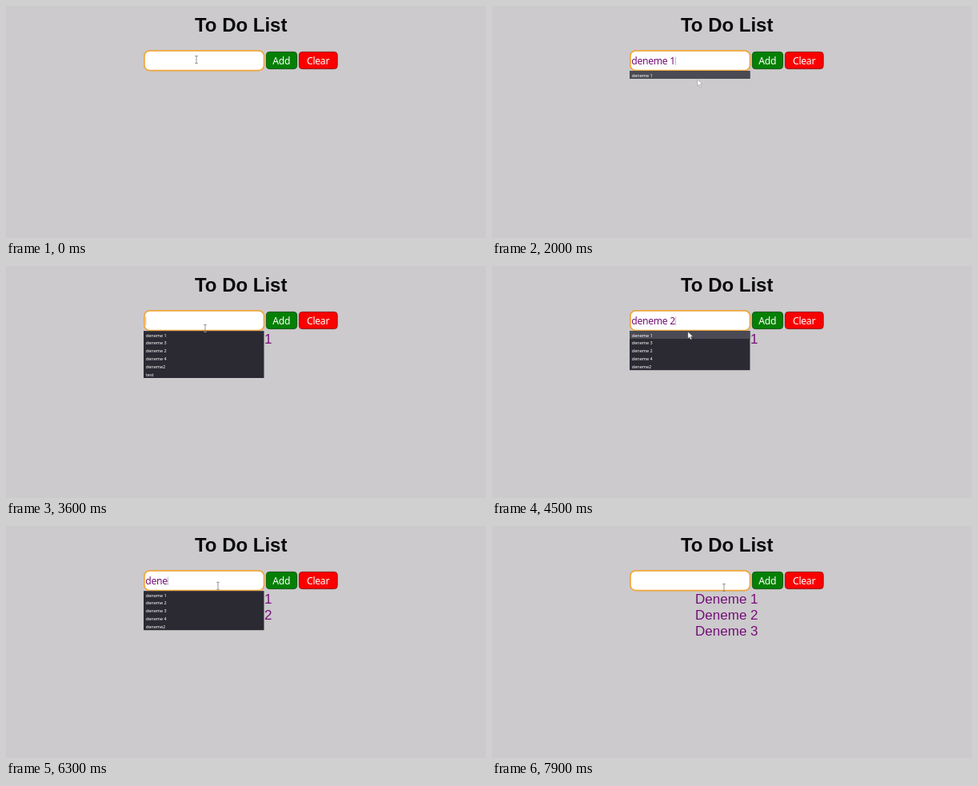
Animation of 600 by 290 pixels, one loop 8000 ms. Source, as an HTML page:

```html
<!DOCTYPE html>
<html lang="en">
<head>
<meta charset="utf-8">
<title>To Do List</title>
<style>
  html, body { margin: 0; width: 100%; height: 100%; overflow: hidden; background: #cccacc; }
  svg { display: block; width: 600px; height: 290px; }
  text { white-space: pre; }
  .ui { font-family: "Noto Sans", "Open Sans", sans-serif; font-size: 12.2px; letter-spacing: -.3px; }
  .arial { font-family: "Liberation Sans", Arial, sans-serif; }
  .purple { fill: #761078; }
  #rows { font-size: 5.5px; font-weight: 500; letter-spacing: 0; fill: #fff; }
</style>
</head>
<body>
<svg viewBox="0 0 600 290">
  <rect width="600" height="290" fill="#cccacc"/>
  <text class="arial" x="293.7" y="32.4" font-size="24" font-weight="bold" text-anchor="middle" fill="#08080c">To Do List</text>
  <g id="items" class="arial purple" font-size="17" text-anchor="middle"></g>

  <rect x="172.9" y="55.9" width="149.6" height="24.7" rx="6.5" fill="#fff" stroke="#f0a53c" stroke-width="1.7"/>
  <text id="entry" class="ui purple" x="174.2" y="72.7"></text>
  <path id="caret" d="M0 63.5v10.5" stroke="#aaa" stroke-width=".8"/>

  <rect id="add" x="325.4" y="57.4" width="38.2" height="21.2" rx="3.8" stroke-width=".9"/>
  <rect x="366.4" y="57.4" width="47.8" height="21.2" rx="3.8" fill="#fb0000" stroke="#8c1414" stroke-width=".9"/>
  <g class="ui" fill="#fff" font-weight="500" text-anchor="middle">
    <text x="344.3" y="72.8">Add</text>
    <text x="390.1" y="72.8">Clear</text>
  </g>

  <g id="menu">
    <rect id="panel" x="172" y="81.2" width="150.5" fill="#2b2a33"/>
    <rect id="hover" x="172" width="150.5" height="9.8" fill="#4a4a54"/>
    <g id="rows" class="ui"></g>
  </g>

  <path id="beam" d="M-1.8-4.5h3.6M0-4.5v9M-1.8 4.5h3.6" fill="none" stroke="#8a8a8a" stroke-width=".9"/>
  <path id="arrow" d="M0 0v8l1.9-1.7 1.4 3 1.3-.6-1.4-2.9 2.6-.2z" fill="#fff" stroke="#777" stroke-width=".4"/>
  <path id="hand" d="M-1 0q1-1 1.6 0v3.5l3 .8q1 .4.8 1.6l-.7 4.1h-4.2l-2.7-3.7q.4-1.2 1.6-.3l.6.5z" fill="#fff" stroke="#333" stroke-width=".4"/>
</svg>
<script>
const LOOP = 8000, STEP = 100, ROW = 9.8, TOP = 81.2, WORD = "deneme ";
const BUTTON = { x: 337, y: 68.5 }, END = { x: 290, y: 77 };
const ui = {};
for (const node of document.querySelectorAll("svg [id]")) ui[node.id] = node;

// One round: the menu opens, a task is typed, the pointer goes to Add and returns.
const rounds = [
  { open: 500, type: 900, digit: 1800, over: 2500, home: { x: 238, y: 67 }, aim: { x: 257, y: 92 } },
  { open: 3300, type: 3700, digit: 4500, over: 5000, home: { x: 249, y: 78 }, aim: { x: 245, y: 82.5 } },
  { open: 5600, type: 5800, digit: 6900, over: 7400, home: { x: 265, y: 74 }, aim: { x: 265, y: 76 } }
].map((r, i) => ({
  ...r, number: i + 1, narrow: r.digit + 100, close: r.digit + 300, click: r.over + 200, leave: r.over + 300
}));

const path = rounds.flatMap((r, i) => [
  { t: r.type, ...r.home },
  { t: r.digit, ...r.aim },
  { t: r.close, ...r.aim },
  { t: r.over, ...BUTTON },
  { t: r.click, ...BUTTON },
  { t: r.click + 300, ...(rounds[i + 1]?.home ?? END) }
]);

function pointerAt(t) {
  const next = path.findIndex(p => p.t > t);
  if (next < 1) return path.at(next);
  const a = path[next - 1], b = path[next];
  const u = (t - a.t) / (b.t - a.t), k = u * u * (3 - 2 * u);
  return { x: a.x + (b.x - a.x) * k, y: a.y + (b.y - a.y) * k };
}

function typedAt(r, t) {
  if (t < r.type) return "";
  const count = 1 + Math.floor((t - r.type) / (r.digit - r.type) * WORD.length);
  return (WORD + r.number).slice(0, count);
}

function suggestions(r, typed, t) {
  if (t >= r.narrow) return [WORD + r.number];
  const order = r.number < 3 ? "1324" : "1234";
  const list = [...[...order].map(n => WORD + n), "deneme2"];
  return typed ? list : [...list, "test"];
}

const show = (node, on) => node.setAttribute("display", on ? "inline" : "none");
const line = (x, y, s) => `<text x="${x}" y="${y}">${s}</text>`;

function draw(t) {
  const done = rounds.filter(r => t >= r.click);
  const round = rounds[done.length];
  const typed = round ? typedAt(round, t) : "";
  const open = !!round && t >= round.open && t < round.close;
  const over = rounds.some(r => t >= r.over && t < r.leave);
  const { x, y } = pointerAt(t);

  ui.items.innerHTML = done.map((r, i) => line(293.3, 97.4 + 20 * i, "Deneme " + r.number)).join("");

  ui.entry.textContent = typed;
  const end = typed ? ui.entry.getComputedTextLength() : 0;
  ui.caret.setAttribute("transform", `translate(${174.8 + end} 0)`);
  show(ui.caret, open || (t >= 100 && t < rounds[0].open));

  ui.add.setAttribute("fill", over ? "#0505f5" : "#058005");
  ui.add.setAttribute("stroke", over ? "#2a2ab0" : "#0d4f0d");
  ui.add.setAttribute("stroke-dasharray", over ? "1 1" : "none");

  show(ui.menu, open);
  if (open) {
    const list = suggestions(round, typed, t);
    const row = list.length === 1 ? 0 : Math.floor((y - TOP) / ROW);
    ui.panel.setAttribute("height", ROW * list.length);
    ui.hover.setAttribute("y", TOP + ROW * row);
    show(ui.hover, row >= 0 && row < list.length);
    ui.rows.innerHTML = list.map((s, i) => line(174.8, 88.6 + ROW * i, s)).join("");
  }

  const pointer = over ? ui.hand : y < TOP ? ui.beam : ui.arrow;
  for (const node of [ui.beam, ui.arrow, ui.hand]) show(node, node === pointer);
  pointer.setAttribute("transform", `translate(${x} ${y})`);
}

let last = -1;
const start = performance.now();
function tick() {
  const elapsed = (performance.now() - start) % LOOP;
  const t = Math.floor(elapsed / STEP) * STEP;
  if (t !== last) draw(last = t);
  requestAnimationFrame(tick);
}
tick();
</script>
</body>
</html>
```
